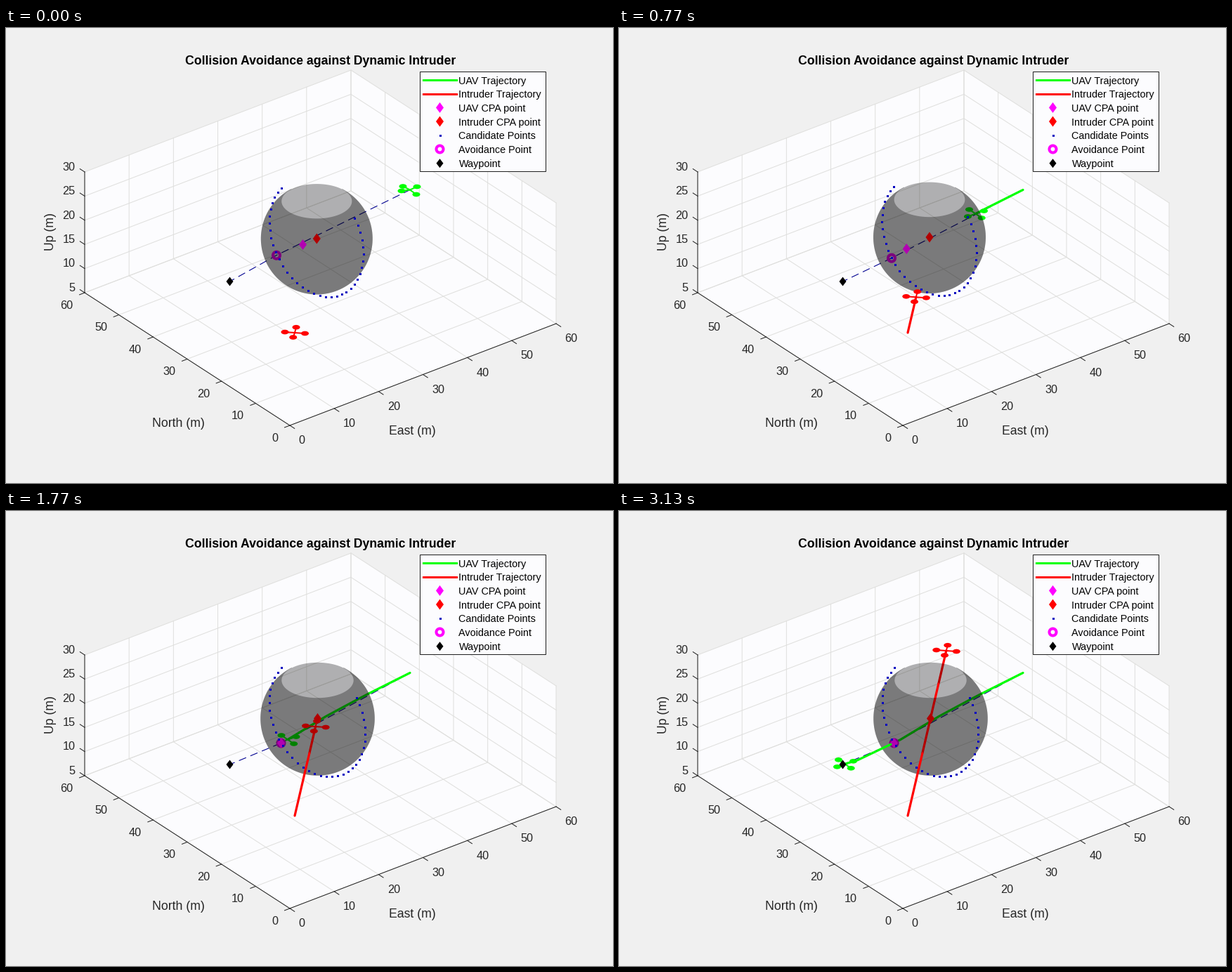
These frames come from a looping animation (864 px wide and 648 px high, 3160 ms). A matplotlib script:

```python
import numpy as np
import matplotlib.pyplot as plt
from matplotlib.animation import FuncAnimation
from matplotlib.patches import Ellipse, Polygon, Rectangle

W, H, DPI = 864, 648, 100
LOOP, STEP = 3160, 20
PT = 72 / DPI  # points per pixel

ROUTE, BEHIND, BACK, INSIDE, SHELL, FRONT = 2.5, 3, 4, 5, 6, 7

plt.rcParams["font.family"] = "Liberation Sans"
fig = plt.figure(figsize=(W / DPI, H / DPI), dpi=DPI, facecolor="#f0f0f0")
ax = fig.add_axes([0, 0, 1, 1])
ax.set_xlim(0, W)
ax.set_ylim(H, 0)
ax.axis("off")


def line(points, color, px=1.0, z=1, **kw):
    x, y = np.transpose(points)
    return ax.plot(x, y, color=color, lw=px * PT, zorder=z, **kw)[0]


def text(x, y, s, px, color="#262626", z=2, **kw):
    return ax.text(x, y + 0.36 * px, s, fontsize=px * PT, color=color,
                   va="baseline", zorder=z, **kw)


def diamond(x, y, w=11, h=15):
    return [(x, y - h / 2), (x + w / 2, y), (x, y + h / 2), (x - w / 2, y)]


def add_diamond(x, y, color, z, w=11, h=15):
    return ax.add_patch(Polygon(diamond(x, y, w, h), fc=color, ec="none", zorder=z))


def ring(x, y, color, z):
    return ax.add_patch(Ellipse((x, y), 10, 10, fc="none", ec=color,
                                lw=4 * PT, zorder=z))


def dots(x, y, z):
    return ax.plot(x, y, "s", color="#0000c0", ms=3 * PT, mew=0, zorder=z)[0]


# --- axes box -------------------------------------------------------------

EAST = np.array([379, -145]) / 60
NORTH = np.array([-292, -189]) / 60
UP = np.array([0, -172]) / 25


def project(e, n, u):
    return np.array([404.0, 566.0]) + e * EAST + n * NORTH + (u - 5) * UP


def draw_axes():
    corners = [(0, 60, 5), (0, 60, 30), (60, 60, 30),
               (60, 0, 30), (60, 0, 5), (0, 0, 5)]
    ax.add_patch(Polygon([project(*c) for c in corners], fc="#fcfcfe",
                         ec="none", zorder=0))
    grid, dark = "#dfdfdd", "#202020"
    for v in range(0, 61, 10):
        line([project(v, 0, 5), project(v, 60, 5), project(v, 60, 30)], grid)
        line([project(0, v, 5), project(60, v, 5), project(60, v, 30)], grid)
    for u in range(5, 31, 5):
        line([project(0, 60, u), project(60, 60, u), project(60, 0, u)], grid)

    line([project(0, 60, 30), project(0, 60, 5), project(0, 0, 5),
          project(60, 0, 5)], dark, z=2)
    e_dir = EAST / np.hypot(*EAST) * 8
    n_dir = NORTH / np.hypot(*NORTH) * 8
    for v in range(0, 61, 10):
        p, q = project(v, 0, 5), project(0, v, 5)
        line([p, p - n_dir], dark, z=2)
        line([q, q - e_dir], dark, z=2)
        text(p[0] + 12.5, p[1] + 20.5, str(v), 16.2, ha="left")
        text(q[0] - 16.5, q[1] + 17, str(v), 16.2, ha="right")
    for u in range(5, 31, 5):
        p = project(0, 60, u)
        line([p, p + n_dir], dark, z=2)
        text(98.5, p[1] - 8, str(u), 16.2, ha="right")

    text(245, 562, "North (m)", 17.6, ha="center")
    text(578.5, 573, "East (m)", 17.6, ha="center")
    ax.text(63, 290, "Up (m)", fontsize=17.6 * PT, color="#262626", rotation=90,
            ha="center", va="center", zorder=2)
    text(447.5, 46, "Collision Avoidance against Dynamic Intruder", 17.6,
         "black", ha="center", weight="bold")


def draw_legend():
    ax.add_patch(Rectangle((588.5, 62), 179.5, 141.5, fc="#fcfcfe", ec="#202020",
                           lw=PT, zorder=10))
    names = ["UAV Trajectory", "Intruder Trajectory", "UAV CPA point",
             "Intruder CPA point", "Candidate Points", "Avoidance Point",
             "Waypoint"]
    rows = [74.5 + 19.7 * i for i in range(7)]
    for name, y in zip(names, rows):
        text(644.5, y, name, 14.4, "black", z=11)
    line([(594, rows[0] - 0.3), (641, rows[0] - 0.3)], "#00ff00", 3, 11)
    line([(594, rows[1] - 0.3), (641, rows[1] - 0.3)], "#ff0000", 3, 11)
    add_diamond(617.5, rows[2] - 0.5, "#ff00ff", 11)
    add_diamond(617.5, rows[3] - 0.5, "#ff0000", 11)
    dots([617.5], [rows[4]], 11)
    ring(617.5, rows[5] - 0.5, "#ff00ff", 11)
    add_diamond(617.5, rows[6], "black", 11, 10, 13)


# --- motion ---------------------------------------------------------------

KEYS = [0, 16, 23, 38, 53, 80, 94]


def track(xs, ys):
    """Position along key points as a function of the simulation step."""
    return lambda k: (np.interp(k, KEYS, xs), np.interp(k, KEYS, ys))


uav_at = track([575, 526, 507.5, 457, 401, 340.5, 321.5],
               [230.5, 255, 264.5, 291.5, 325.5, 354.5, 360.3])
intruder_at = track([411, 419.5, 422.8, 431.3, 440.6, 457.4, 465.8],
                    [434, 398, 383.3, 347.5, 307, 235, 199])
center_at = track([442.3, 441, 442, 443.3] + [443.5] * 3,
                  [300, 299, 298, 296.3] + [295.5] * 3)
cpa_at = track([422.5, 413.3, 409.3, 398] + [391.5] * 3,
               [308.5, 312.5, 314.5, 321] + [330.5] * 3)
avoid_at = track([385, 386.3, 388, 391] + [391.5] * 3,
                 [323.7, 326.5, 327.7, 330.2] + [330.5] * 3)
START, WAYPOINT = (576, 230), (318.5, 361)


def uav_layer(x, y):
    return np.where(x > 499, BEHIND, np.where(x > 387, INSIDE, FRONT))


def intruder_layer(x, y):
    return np.where(y < 246, BEHIND, np.where(y < 345, INSIDE, FRONT))


class Drone:
    def __init__(self, pos, layer, hubs, color, inner, first_hubs=None):
        self.pos, self.layer = pos, layer
        self.hubs = np.array(hubs, float)
        self.first = self.hubs if first_hubs is None else np.array(first_hubs, float)
        self.colors = {BEHIND: color, INSIDE: inner, FRONT: color}
        self.trail = {z: line([(0, 0)], c, 3.2, z, solid_capstyle="round")
                      for z, c in self.colors.items()}
        self.arms = [line([(0, 0)], color, 2) for _ in hubs]
        self.rotors = [ax.add_patch(Ellipse((0, 0), 11, 6.6, ec="none"))
                       for _ in hubs]

    def update(self, k):
        x, y = self.pos(np.linspace(0, k, 10 * k + 1))
        layers = self.layer(x, y)
        for z, trail in self.trail.items():
            trail.set_data(np.where(layers == z, x, np.nan), y)
        mix = min(k / 5, 1)
        offsets = self.first + (self.hubs - self.first) * mix
        cx, cy = x[-1], y[-1]
        for arm, rotor, (dx, dy) in zip(self.arms, self.rotors, offsets):
            z = int(self.layer(cx + dx, cy + dy))
            arm.set_data([cx, cx + dx], [cy, cy + dy])
            arm.set_color(self.colors[z])
            rotor.set_center((cx + dx, cy + dy))
            rotor.set_facecolor(self.colors[z])
            arm.set_zorder(z + 0.1)
            rotor.set_zorder(z + 0.2)


def shell(cx, cy, r, front):
    """Half of the open-topped sphere: silhouette arc plus one side of the rim."""
    phi = np.radians(np.linspace(27, 333, 120))
    rim = np.radians(np.linspace(136, 404 if front else 44, 60))
    x = np.r_[np.sin(phi), 0.63 * np.cos(rim)]
    y = np.r_[-np.cos(phi), -0.67 - 0.31 * np.sin(rim)]
    return np.c_[cx + r * x, cy + r * y]


draw_axes()
draw_legend()

glass = dict(fc="black", ec="none", alpha=0.3)
back = ax.add_patch(Polygon([(0, 0)] * 3, zorder=BACK, **glass))
front = ax.add_patch(Polygon([(0, 0)] * 3, zorder=SHELL, **glass))
uav = Drone(uav_at, uav_layer,
            [(-9, -6), (12, -4), (-11, 4), (8.7, 6)], "#00ff00", "#00b900",
            [(-10, -5), (10, -4.5), (-12, 1.5), (9, 6.5)])
intruder = Drone(intruder_at, intruder_layer,
                 [(2, -7.8), (-14, -1), (14.5, 1), (-2.3, 6.5)],
                 "#ff0000", "#ff0000")
route = line([START, WAYPOINT], "#000090", 1.1, ROUTE, dashes=(10, 6))
avoid = ring(0, 0, "#b400b4", INSIDE + 0.5)
uav_cpa = add_diamond(0, 0, "#ff00ff", INSIDE + 0.6)
intruder_cpa = add_diamond(0, 0, "#ff0000", INSIDE + 0.6)
candidates = dots([], [], 8)
add_diamond(*WAYPOINT, "black", 9, 10, 13)

ARC = np.radians(-35.3 + 7.13 * np.arange(37))


def update(i):
    t = i * STEP + STEP / 2
    k = min(int((t + 5) * 3 / 100), KEYS[-1])
    cx, cy = center_at(k)
    r = np.interp(k, KEYS[:5], [79.5, 79.6, 80, 80.7, 81.3])
    back.set_xy(shell(cx, cy, r, False))
    front.set_xy(shell(cx, cy, r, True))
    candidates.set_data(cx - 0.5 + 0.84 * r * np.cos(ARC),
                        cy - 1.2 + 23 * np.cos(ARC) + 81 * np.sin(ARC))
    px, py = avoid_at(k)
    avoid.set_center((px, py))
    route.set_data([START[0], px, WAYPOINT[0]], [START[1], py, WAYPOINT[1]])
    uav_cpa.set_xy(diamond(*cpa_at(k)))
    intruder_cpa.set_xy(diamond(cx, cy))
    uav.update(k)
    intruder.update(k)
    return []


anim = FuncAnimation(fig, update, frames=LOOP // STEP, interval=STEP,
                     repeat=True, repeat_delay=0, blit=False)
plt.show()
```
